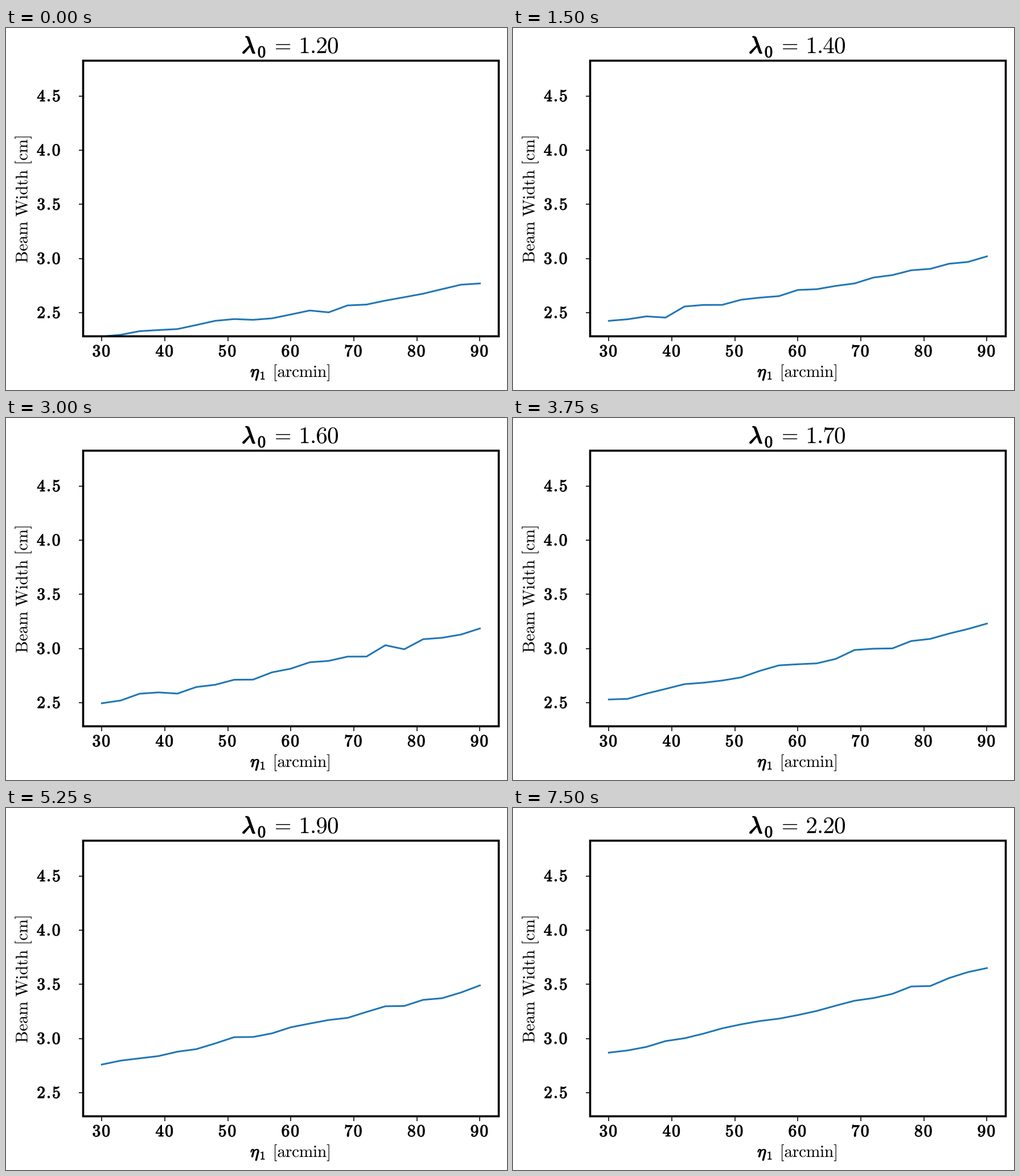
A matplotlib script for the animation above (8000 ms loop, 880 by 637 pixels).

```python
import numpy as np
import matplotlib.pyplot as plt
from matplotlib.animation import FuncAnimation
from matplotlib.patches import PathPatch, Rectangle
from matplotlib.textpath import TextPath
from matplotlib.transforms import Affine2D

W, H, DPI = 880, 637, 64
PX = 72 / DPI
LEFT, RIGHT, TOP, BOTTOM = 135.5, 865.5, 57.5, 542.5

plt.rcParams["mathtext.fontset"] = "cm"
fig = plt.figure(figsize=(W / DPI, H / DPI), dpi=DPI, facecolor="white")
ax = fig.add_axes([0, 0, 1, 1])
ax.set(xlim=(0, W), ylim=(H, 0))
ax.axis("off")


def to_x(arcmin):
    return 168.3 + (arcmin - 30) * 11.068


def to_y(cm):
    return 501 - (cm - 2.5) * 190.7


# Beam width at both ends of the sweep, for a few wavelengths
KEYS = [1.2, 1.3, 1.5, 1.7, 1.9, 2.2]
AT_30 = [2.28, 2.39, 2.46, 2.53, 2.76, 2.87]
AT_90 = [2.77, 2.90, 3.14, 3.23, 3.49, 3.65]
eta = np.linspace(30, 90, 21)


def beam_width(step):
    """Slightly sagging rise between the two ends, with measurement noise."""
    lam = 1.2 + step / 10
    start, end = np.interp(lam, KEYS, AT_30), np.interp(lam, KEYS, AT_90)
    s = (eta - 30) / 60
    noise = np.random.default_rng(step).normal(0, 0.018, eta.size)
    noise[[0, -1]] = 0
    return start + (end - start) * s - 0.12 * s * (1 - s) + noise


def spaced(text, font, track):
    out = ""
    for c in text:
        glyph = r"\ " if c == " " else c
        gap = track - 0.2 if c == "." else track  # mathtext pads a lone dot
        out += rf"\{font}{{{glyph}}}\hspace{{{gap:.3f}}}"
    return f"${out}$"


def ink(math, size, x, y, align=0.0, turn=0):
    """Glyph outlines with the ink aligned at x on baseline y."""
    path = TextPath((0, 0), math, size=size)
    box = path.get_extents()
    shift = -box.x0 - align * box.width
    move = Affine2D().translate(shift, 0).scale(1, -1).rotate_deg(turn)
    return move.translate(x, y).transform_path(path)


def put(path, weight=0.0):
    patch = PathPatch(path, facecolor="black", edgecolor="black",
                      linewidth=weight * PX, joinstyle="miter")
    return ax.add_patch(patch)


def bold(text, size, x, y, align=0.0):
    put(ink(spaced(text, "mathbf", 0.075), size, x, y, align), 0.036 * size)


def title_value(step):
    text = spaced(f"{1.2 + step / 10:.2f}", "mathrm", -0.03)
    return ink(text, 41.5, 583, 44.3, 1)


# Frame, ticks and tick labels
frame = dict(xy=(LEFT, TOP), width=RIGHT - LEFT, height=BOTTOM - TOP)
ax.add_patch(Rectangle(**frame, fill=False, edgecolor="black",
                       linewidth=3.6 * PX, zorder=3, snap=False))
tick = dict(color="black", linewidth=1.6 * PX, solid_capstyle="butt", zorder=1)
for arcmin in range(30, 91, 10):
    x = to_x(arcmin)
    ax.plot([x, x], [BOTTOM, BOTTOM + 8], **tick)
    bold(str(arcmin), 29.5, x - 1, 577.7, 0.5)
for cm in np.arange(2.5, 4.6, 0.5):
    y = to_y(cm)
    ax.plot([LEFT - 8, LEFT], [y, y], **tick)
    bold(f"{cm:.1f}", 29.5, 94.3, y + 9.3, 1)

# Axis labels
put(ink(spaced("Beam Width [cm]", "mathrm", -0.004), 29.5, 37.5, 412.5, turn=-90))
put(ink(r"$\eta$", 30, 430, 614), 1.3)
bold("1", 20, 447.5, 618.3)
put(ink(spaced("[arcmin]", "mathrm", -0.012), 29.5, 472, 614))

# Title
put(ink(r"$\lambda$", 42, 416, 44.3), 1.8)
bold("0", 28.5, 443, 51.3)
put(ink("$=$", 38, 474, 42.5))
value = put(title_value(0))

line, = ax.plot(to_x(eta), to_y(beam_width(0)), color="#1f77b4",
                linewidth=3 * PX, zorder=2)
line.set_clip_path(Rectangle(**frame, transform=ax.transData))


def draw(n):
    step = n // 3
    line.set_ydata(to_y(beam_width(step)))
    value.set_path(title_value(step))
    return line, value


anim = FuncAnimation(fig, draw, frames=32, interval=250, repeat=True,
                     repeat_delay=0, blit=False)
plt.show()
```
